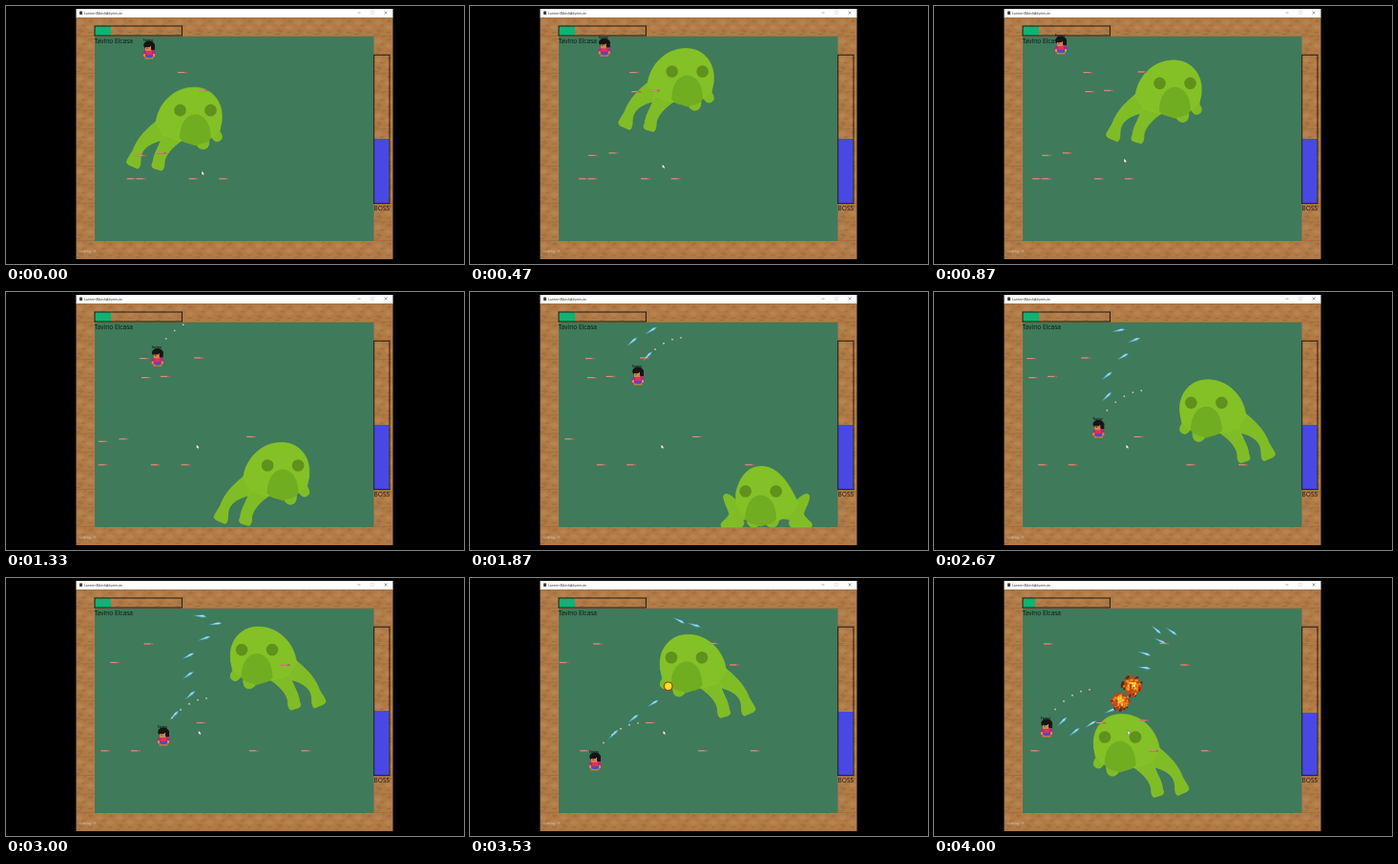
An HTML page with a canvas that plays this animation: 480 px wide and 270 px high, repeating every 4.07 s.

```html
<!DOCTYPE html>
<html lang="en">
<head>
<meta charset="utf-8">
<title>Boss fight</title>
<style>
  html, body { margin: 0; width: 100%; height: 100%; overflow: hidden; background: #000; }
  svg, canvas { position: absolute; left: 0; top: 0; width: 480px; height: 270px; }
  text { font-family: "Open Sans", "Noto Sans", sans-serif; }
  .frame { fill: none; stroke: #15110c; stroke-width: .9; }
</style>
</head>
<body>
<svg viewBox="0 0 480 270">
  <defs>
    <pattern id="dirt" x="72.3" y="12.5" width="20.85" height="19.45" patternUnits="userSpaceOnUse">
      <rect width="21" height="20" fill="#b17b47"/>
      <path d="M0 5l5-3 5 3-5 3zM11 10l5-3 5 3-5 3z" fill="#b8834e"/>
      <path d="M2 13l4-2 4 3-4 2zM13 3l4-2 3 2-4 2z" fill="#a5713f"/>
      <path d="M7 8h4M1 17h5M14 15h4M9 1h3" stroke="#9d6b3b"/>
      <path d="M0 19h21" stroke="#9d6b3b" stroke-width=".8"/>
    </pattern>
  </defs>
  <rect x="73.5" y="3" width="332" height="9.5" fill="#fff"/>
  <rect x="73.5" y="12" width="332" height="253" fill="url(#dirt)"/>
  <rect x="93" y="32" width="292.5" height="214" fill="#3f7a5b"/>
  <rect x="77" y="5.5" width="3" height="3.5" fill="#444"/>
  <text x="82" y="8.7" font-size="3.5" fill="#222">LanternMarshAdventure</text>
  <path d="M368.500 7h3M396.500 5.500l3 3m0-3l-3 3" fill="none" stroke="#555" stroke-width=".5"/>
  <path d="M382.500 5.500h3v3h-3z" fill="none" stroke="#ccc" stroke-width=".5"/>
  <rect id="hp" x="93" y="21" height="10" fill="#12b274"/>
  <rect class="frame" x="93" y="21" width="91.500" height="10"/>
  <rect id="boss" x="386" width="15.500" fill="#4848e4"/>
  <rect class="frame" x="385.700" y="51.200" width="16.300" height="155.500"/>
  <text x="92.500" y="39" font-size="6.600" fill="#0b1510">Tavino Elcasa</text>
  <text x="385.500" y="214" font-size="6.600" fill="#111">BOSS</text>
  <text x="77" y="258" font-size="4.300" fill="#dcc8b4">Lobby: 9</text>
</svg>
<canvas id="stage" width="480" height="270"></canvas>
<script>
const g = document.getElementById("stage").getContext("2d");
const hpBar = document.getElementById("hp"), bossBar = document.getElementById("boss");
const LOOP = 4070, STEP = 200 / 3;

// Distance scrolled, with a slow start: [time, distance]
const scrollMarks = [[0, 0], [870, 23.5], [1870, 59], [LOOP, 124]];
// Turning points of the hero's walk: [time, x, y]
const walk = [
  [0, 150, 46], [870, 133, 41], [1424, 164, 74], [1647, 152, 80], [1870, 176, 88],
  [2270, 167, 113], [2330, 159, 119], [2763, 176, 150], [3000, 165, 166],
  [3530, 131, 192], [3770, 123, 190], [4000, 118, 157]
];
// Shots that strike the boss
const hits = [{ shot: 6, at: 3500, size: 11 }, { shot: 7, at: 3650, size: 9.5 }];

const GREEN = "#84c126", LIGHT = "#8ac62a", LIMB = "#80bc25", BELLY = "#70ad21", EYE = "#5f911c";
const bell = "M-16.500 9C-16-7-9-16 0-16C9-16 16-7 16.500 9Q13 14 6 15L0 17L-6 15Q-13 14-16.500 9Z";
const jumpShape = {
  limbs: [
    "M-18 35C-28 43-38 52-43 66L-49 76Q-51 80-45 82L-38 85Q-35 84-35 76C-35 66-28 59-12 55L-5 48Z",
    "M-12 50C-15 62-21 68-22 78Q-25 84-20 85L-13 87Q-10 86-10 78C-9 70-1 62 9 55Z",
    "M38 40L40 53Q44 59 49 55Q52 52 48 46L50 34Z",
    "M20 52L25 62Q30 67 35 63Q38 59 36 50Z"
  ],
  body: "M-19 38C-17 17 0 0 21 0C42 0 52 18 50 34C49 46 40 57 22 57C8 57-2 54-10 50Z",
  eyes: 6.5,
  face: [22.5, 24, 44]
};
const hindLeg = "M-26 42C-32 34-42 25-45 31C-45 38-39 46-39 50C-41 56-50 58-47 63.500L-26 63.500Q-22 60-25 56L-16 54Z";
const foreFoot = "M-7 50L-8 59Q-6 64 0 63.500Q7 63 6 50Z";
const sitShape = {
  limbs: [[-1, -1], [1, -1]].map(([flip, x]) => ({ d: hindLeg, flip: -flip, x }))
    .concat([-13, 6].map(x => ({ d: foreFoot, flip: 1, x }))),
  body: "M-33 28C-29 10-20 0-6 0C8 0 20 12 31 36C31 48 20 58-4 58C-24 58-34 46-33 28Z",
  face: [-7, 26, 46]
};

const mod = (a, n) => ((a % n) + n) % n;

function along(marks, t) {
  let i = 0;
  while (i < marks.length - 2 && t > marks[i + 1][0]) i++;
  const a = marks[i], b = marks[i + 1];
  const u = Math.min(1, (t - a[0]) / (b[0] - a[0]));
  return a.slice(1).map((v, j) => v + (b[j + 1] - v) * u);
}

const scroll = t => along(scrollMarks, t)[0];
const hero = t => along(walk, t);

// Hold time on a 15 fps grid, with two dropped ticks
function tick(t) {
  const start = k => Math.round(k * STEP / 10) * 10;
  let k = Math.floor(t / STEP) + 1;
  while (k > 0 && start(k) > t) k--;
  if (k === 17 || k === 39) k--;
  return Math.min(start(k), 4000);
}

// The boss paces between the walls and leaps at a steady rate
function frog(p) {
  const half = 86, hop = 83.8;
  const phase = mod(p - 70, 2 * half);
  const d = mod(p - 15 + hop / 2, hop) - hop / 2;
  const air = Math.abs(d) < 25.2;
  return {
    x: 337 - 2.3 * Math.min(phase, 2 * half - phase),
    y: air ? 43.5 + 0.185 * d * d : 182.5,
    left: phase < half,
    air
  };
}

// Point of the hero's throw after moving d to the right
const arc = (x, y, d) => [x + d, y - 9 - 1.3 * d + 0.0135 * d * d];

function shot(i, t) {
  const born = 1424 + 223 * i;
  const d = 10 + scroll(t) - scroll(born);
  const [x, y] = arc(...hero(born), d);
  return { x, y, slope: 0.027 * d - 1.3, born, top: arc(0, hero(born)[1], Math.min(d, 48))[1] };
}

function rng(seed) {
  return () => (seed = (seed * 16807) % 2147483647) / 2147483647;
}

function box(color, x, y, w, h) {
  g.fillStyle = color;
  g.fillRect(x, y, w, h);
}

function oval(color, x, y, rx, ry = rx) {
  g.fillStyle = color;
  g.beginPath();
  g.ellipse(x, y, rx, ry, 0, 0, 7);
  g.fill();
}

function shape(d, fill, stroke, width = 1) {
  const path = new Path2D(d);
  g.fillStyle = fill;
  g.fill(path);
  if (!stroke) return;
  g.strokeStyle = stroke;
  g.lineWidth = width;
  g.stroke(path);
}

function at(x, y, paint) {
  g.save();
  g.translate(x, y);
  paint();
  g.restore();
}

function drawFrog({ x, y, left, air }) {
  const s = air ? jumpShape : sitShape;
  const [fx, eyeY, bellyY] = s.face;
  at(x, y, () => {
    if (air && left) g.scale(-1, 1);
    for (const limb of s.limbs) {
      const { d = limb, flip = 1, x: lx = 0 } = limb;
      at(lx, 0, () => { g.scale(flip, 1); shape(d, LIMB, LIGHT, 0.7); });
    }
    shape(s.body, GREEN, LIGHT, 0.7);
    at(fx, bellyY, () => shape(bell, BELLY));
    for (const side of [-16, 16]) oval(EYE, fx + side, eyeY, 6.3);
  });
}

function drawDart(x, y) {
  box("#a8685c", x - 5, y - 0.8, 10, 1.5);
  box("#dc9c8e", x - 5, y - 0.6, 7, 0.8);
}

function drawShard({ x, y, slope }) {
  at(x, y, () => {
    g.rotate(Math.atan(slope));
    shape("M-7 0L3-1.500L7 0L3 1.300Z", "#6fc0de", "#3f8aa3", 0.3);
    shape("M-4 0L3-.8L6 0Z", "#c8f0f8");
  });
}

function drawHero(x, y) {
  at(x, y, () => {
    g.fillStyle = "#12251c";
    g.font = 'bold 3.2px "Open Sans", sans-serif';
    g.textAlign = "center";
    g.fillText("Tavino", -1, -9.5);
    box("#c47a3f", -4.5, 6, 9, 3.5);
    oval("#b3287f", 0, 3.5, 6.5, 4.5);
    box("#e0305a", -3, 0, 6, 5);
    box("#3a55c8", -2, 5, 5, 3);
    box("#d88a50", -6, 4, 2, 3);
    box("#d88a50", 4, 4, 2, 3);
    oval("#171414", 0, -5, 5.8, 4.5);
    box("#171414", 2.5, -6, 3.5, 6);
    box("#d2844b", -4, -4, 6, 5);
    box("#171414", -4, -5, 5, 2);
    box("#171414", -2.5, -2.5, 1, 1);
  });
}

function drawBlast(x, y, age, size) {
  if (age < 60) {
    oval("#9b3a12", x, y, 4.8);
    oval("#ffe02c", x, y, 3.7);
    return;
  }
  const r = size * Math.min(1, 0.45 + age / 400);
  const rand = rng(Math.round(x * 31 + age));
  oval("#bd4a16", x, y, r * 0.82);
  const ramp = ["#fff4bd", "#ffd233", "#f48a1c", "#c9401a", "#5e2412"];
  for (let i = 0; i < 95; i++) {
    const a = rand() * 6.283, d = Math.sqrt(rand());
    const heat = Math.floor((d + rand() * 0.6) * 3.1);
    box(ramp[Math.min(4, heat)], x + Math.cos(a) * d * r - 1, y + Math.sin(a) * d * r - 1, 2, 2);
  }
}

function drawCursor(t) {
  const u = Math.min(1, t / 870);
  at(205 - 7 * u + 5 * u * t / LOOP, 172.5 - 13 * u, () =>
    shape("M0 0V4.500L1 3.500L2 5L2.700 4.600L2 3.200H3.200Z", "#fff", "#333", 0.3));
}

function draw(t) {
  const p = scroll(t), [hx, hy] = hero(t);
  const landed = hits.filter(h => t >= h.at);
  const bossTop = 139 + landed.length;
  hpBar.setAttribute("width", t < 3730 ? 17 : 13);
  bossBar.setAttribute("y", bossTop);
  bossBar.setAttribute("height", 206.5 - bossTop);
  g.clearRect(0, 0, 480, 270);

  for (let i = 0; i < 12; i++) {
    const s = shot(i, t);
    if (t >= s.born && s.top > 34 && !landed.some(h => h.shot === i)) drawShard(s);
  }
  drawFrog(frog(p));

  // The boss drops a dart at even distances; darts drift left with the scroll
  for (let q = 20 - 16.7 * 9; q <= p; q += 16.7) {
    const f = frog(q), x = f.x + q - p;
    if (x > 97.6) drawDart(x, Math.min(f.y + 21, 181));
  }
  drawHero(hx, hy);
  for (let d = 9; d <= 45; d += 9) {
    const [x, y] = arc(hx, hy, d);
    if (y > 32) oval("#dbc6b0", x, y, 0.9);
  }
  for (const h of landed) {
    const { x, y } = shot(h.shot, h.at);
    drawBlast(x, y, t - h.at, h.size);
  }
  drawCursor(t);
}

let last = -1;
function loop() {
  const t = tick(performance.now() % LOOP);
  if (t !== last) draw(last = t);
  requestAnimationFrame(loop);
}
loop();
</script>
</body>
</html>
```
